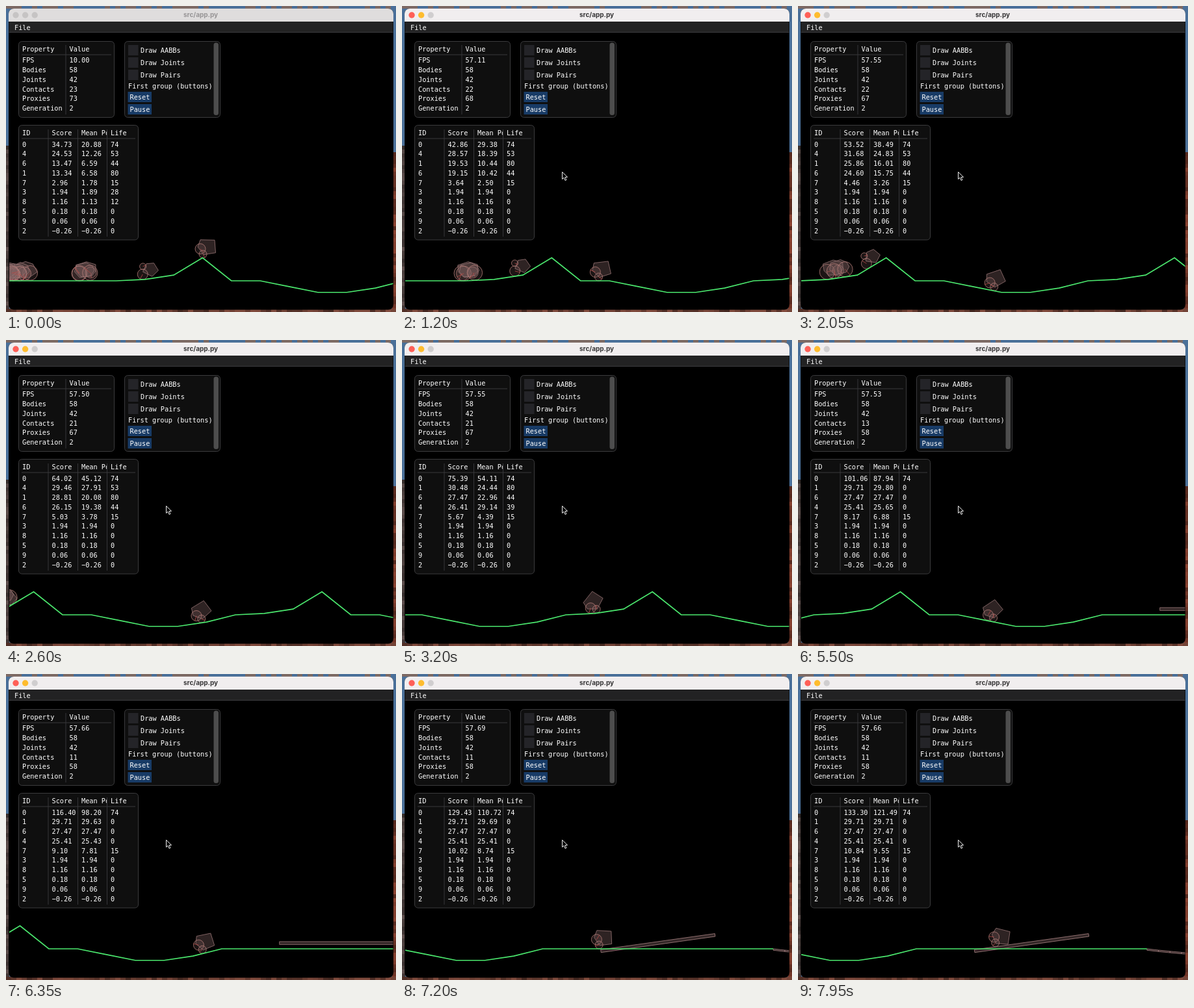
Animation, 600 px wide and 471 px high, one loop 8 s. Source, as an HTML page with a canvas:

```html
<!DOCTYPE html>
<html lang="en">
<head>
<meta charset="utf-8">
<title>src/app.py</title>
<style>
html, body { margin: 0; width: 100%; height: 100%; overflow: hidden; background: #000; }
canvas { display: block; }
</style>
</head>
<body>
<canvas id="stage" width="600" height="471"></canvas>
<script>
const ctx = document.getElementById('stage').getContext('2d');
const LOOP = 8000, STEP = 50;
const UNIT = 8.87, BASE = 423, CENTER = 300;
const MEMORY = 2.36; // seconds covered by the mean position
const MONO = '10.25px "DejaVu Sans Mono", monospace';
const RAD = Math.PI / 180;
const clamp = (v, a, b) => Math.min(b, Math.max(a, v));
const smooth = u => u * u * (3 - 2 * u);
const falloff = (t, mid, rate) => 1 / (1 + Math.exp(rate * (t - mid)));

function random(seed) {
  return () => (seed = (seed * 16807) % 2147483647) / 2147483647;
}

// The simulation starts slowly and ends up a constant lag behind real time.
const clock = t => t - 0.72 * (1 - Math.exp(-t / 0.74));
const MARKS = [0, 2.05, 3.2, 4.3, 5.5, 7.2, 7.95].map(clock);

// Monotone cubic through one value per mark; the last value is held.
function curve(...v) {
  const last = v.length - 1;
  const slope = i => (v[i + 1] - v[i]) / (MARKS[i + 1] - MARKS[i]);
  const tangent = i => {
    if (i === 0) return slope(0);
    if (i === last) return slope(last - 1);
    const a = slope(i - 1), b = slope(i);
    return a * b <= 0 ? 0 : 2 * a * b / (a + b);
  };
  return c => {
    if (c >= MARKS[last]) return v[last];
    let i = 0;
    while (c > MARKS[i + 1]) i++;
    const h = MARKS[i + 1] - MARKS[i], u = (c - MARKS[i]) / h, w = 1 - u;
    return v[i] + (v[i + 1] - v[i]) * smooth(u)
      + h * u * w * (tangent(i) * w - tangent(i + 1) * u);
  };
}

const fps = t => 57.6 - 47.6 * Math.exp(-4 * t) + 0.1 * Math.sin(9 * t) * Math.min(t, 1);
const contacts = t => Math.floor(11 + 11 * falloff(t, 4.9, 2.2) + 2 * Math.exp(-2 * t));
const proxies = t => Math.round(58 + 9 * falloff(t, 4.5, 4) + 6 * Math.exp(-2 * t));
const leadAngle = curve(0, -20, -53, -124, -35, 2, 13);

// Uneven ring of corners around (x, y).
function chassis(x, y, rx, ry, corners, seed) {
  const rnd = random(seed * 7919 + 13);
  return Array.from({ length: corners }, (_, i) => {
    const q = (i + 0.4 * rnd()) * 2 * Math.PI / corners, r = 0.8 + 0.3 * rnd();
    return [x + rx * r * Math.cos(q), y + ry * r * Math.sin(q)];
  });
}

// share: mean position at the start as a part of the score.
// stall: time at which the life begins to drain.
function makeCar(id, share, life, stall, travel, shape) {
  const power = share / (1 - share);
  const score = c => c >= 0 ? travel(c) : travel(0) * (1 - (-c / MEMORY) ** power);
  const mean = c => {
    const n = 24;
    let sum = 0;
    for (let i = 0; i < n; i++) sum += score(c - MEMORY * (i + 0.5) / n);
    return sum / n;
  };
  const rnd = random(id * 104729 + 31);
  const size = () => 8.5 + 3.5 * rnd();
  return {
    id, score, mean,
    life: t => clamp(Math.round(life - Math.max(0, t - stall) * 70), 0, life),
    body: chassis(12, -15, 17, 13, 7, id + 1),
    wheels: [[2, -10, size()], [19, -11, size()]],
    ...shape
  };
}
const parked = (id, score, share = 1, life = 0) => makeCar(id, share, life, 0, () => score);

const lead = makeCar(0, 0.601, 74, Infinity,
  curve(34.73, 53.52, 75.39, 87.79, 101.06, 129.43, 133.3), {
    body: [[-1, -25.5], [21, -25], [22.5, -5.5], [4, -2.5], [-5, -14.5]],
    wheels: [[-1, -11.5, 8], [3, -3.3, 6]]
  });
const cars = [
  lead,
  makeCar(4, 0.5, 53, 3, curve(24.53, 31.68, 26.41, 25.41), {
    body: chassis(14, -11, 13, 12, 5, 4),
    wheels: [[1, -5, 8], [2, -17, 5]]
  }),
  makeCar(6, 0.489, 44, 4.5, curve(13.47, 24.6, 27.47)),
  makeCar(1, 0.493, 80, 4.3, curve(13.34, 25.86, 30.48, 29.5, 29.71)),
  makeCar(7, 0.601, 15, Infinity, c => 2.96 + 1.09 * c),
  parked(3, 1.94, 0.974, 28), parked(8, 1.16, 0.974, 12),
  parked(5, 0.18), parked(9, 0.06), parked(2, -0.26)
];

const hills = [0.25, 1, 4, 0, 0, -1, -2, -2, -1.25, 0];
function ground(x) {
  if (x < 20 || x >= 120) return 0;
  const p = (x - 20) / 5, i = Math.floor(p);
  const a = hills[(i + 9) % 10], b = hills[i % 10];
  return a + (b - a) * (p - i);
}

let cam = 0, tilt = 0;
const sx = x => CENTER + (x - cam) * UNIT;
const sy = y => BASE - y * UNIT;

function surface(x) {
  const y = ground(x);
  return x > 130 && x < 150 ? Math.max(y, 1.25 + (x - 140) * Math.tan(tilt)) : y;
}

function path(points, close) {
  ctx.beginPath();
  for (const [x, y] of points) ctx.lineTo(x, y);
  if (close) ctx.closePath();
}

function paint(alpha, stroke) {
  ctx.fillStyle = `rgba(128,98,98,${alpha})`;
  ctx.strokeStyle = stroke;
  ctx.lineWidth = 0.8;
  ctx.fill();
  ctx.stroke();
}

function plank(x, y, w, h, angle) {
  ctx.save();
  ctx.translate(x, y);
  ctx.rotate(angle);
  ctx.beginPath();
  ctx.rect(-w / 2, -h / 2, w, h);
  paint(0.4, '#a07c7c');
  ctx.restore();
}

function drawCar(car, c) {
  const pos = car.score(c), x0 = sx(pos);
  if (x0 < -40) return;
  const slope = Math.atan((ground(pos + 1) - ground(pos - 1)) / 2);
  const a = car === lead ? leadAngle(c) * RAD : -0.7 * slope;
  const cos = Math.cos(a), sin = Math.sin(a);
  const turn = ([x, y, r]) => [x * cos - y * sin, x * sin + y * cos, r];
  const body = car.body.map(turn), wheels = car.wheels.map(turn);

  // Lower the car until its first point touches the surface.
  const feet = [...body];
  for (const [x, y, r] of wheels)
    for (let i = 0; i <= 12; i++) {
      const q = i * Math.PI / 12;
      feet.push([x + r * Math.cos(q), y + r * Math.sin(q)]);
    }
  const y0 = Math.min(...feet.map(([x, y]) => sy(surface(pos + x / UNIT)) - y));

  ctx.save();
  ctx.translate(x0, y0);
  path(body, true);
  paint(0.36, '#9a7676');
  for (const [x, y, r] of wheels) {
    ctx.beginPath();
    ctx.arc(x, y, r, 0, 7);
    paint(0.22, '#b47d78');
    const q = pos * UNIT / r;
    path([[x, y], [x + r * Math.cos(q), y + r * Math.sin(q)]]);
    ctx.strokeStyle = '#b84a46';
    ctx.stroke();
  }
  ctx.restore();
}

function drawWorld(c) {
  cam = lead.score(c);
  tilt = 8 * RAD * smooth(clamp((cam - 126.5) / 1.7, 0, 1));
  ctx.save();
  ctx.beginPath();
  ctx.rect(5, 41, 590.5, 426);
  ctx.clip();

  for (const car of cars) drawCar(car, c);
  plank(sx(140), sy(1), 20 * UNIT, 0.5 * UNIT, -tilt);
  const sag = x => -0.125 - 1.2 * (1 - ((x - 180) / 20) ** 2);
  for (let x = 160; x < 200; x += 2) {
    const a = sag(x), b = sag(x + 2);
    plank(sx(x + 1), sy((a + b) / 2), 2 * UNIT, 0.25 * UNIT, Math.atan((a - b) / 2));
  }

  const line = [[sx(-20), BASE]];
  for (let x = 20; x <= 120; x += 5) line.push([sx(x), sy(ground(x))]);
  line.push([sx(160), BASE]);
  path(line);
  ctx.strokeStyle = '#4be86e';
  ctx.lineWidth = 1.7;
  ctx.stroke();
  ctx.restore();
}

function rect(x, y, w, h, fill, r = 0, stroke) {
  ctx.beginPath();
  ctx.roundRect(x, y, w, h, r);
  ctx.fillStyle = fill;
  ctx.fill();
  if (stroke) {
    ctx.strokeStyle = stroke;
    ctx.lineWidth = 1;
    ctx.stroke();
  }
}

function text(str, x, y) {
  ctx.font = MONO;
  ctx.textAlign = 'left';
  ctx.fillStyle = '#fff';
  ctx.fillText(String(str).replace('-', '\u2212'), x, y + 3.6);
}

const panel = (x, y, w, h) => rect(x + 0.5, y + 0.5, w, h, '#0f0f0f', 5, '#3b3b3d');

function grid(left, right, top, bottom, rule, columns) {
  rect(left, rule, right - left, 1, '#3a3a3d');
  for (const x of columns) rect(x, top, 1, bottom - top, '#37373a');
}

function drawStats(t) {
  panel(19, 54, 147, 117);
  grid(24, 162, 60, 167, 74.5, [91.5]);
  text('Property', 25, 66);
  text('Value', 97.5, 66);
  const rows = { FPS: fps(t).toFixed(2), Bodies: 58, Joints: 42,
    Contacts: contacts(t), Proxies: proxies(t), Generation: 2 };
  Object.entries(rows).forEach(([name, value], i) => {
    const y = 83.8 + i * 14.75;
    text(name, 25, y);
    text(value, 97.5, y);
  });
}

function drawControls() {
  panel(182, 54, 147, 117);
  ['Draw AABBs', 'Draw Joints', 'Draw Pairs'].forEach((label, i) => {
    rect(188, 60 + i * 19, 15.5, 16, '#242428');
    text(label, 207, 68 + i * 19);
  });
  text('First group (buttons)', 188, 123.7);
  ['Reset', 'Pause'].forEach((label, i) => {
    rect(187.5, 132 + i * 19, 36.5, 16, '#183b66');
    text(label, 190.5, 140 + i * 19);
  });
  rect(319.5, 56.5, 7.5, 111.5, '#4d4d4d', 3.5);
}

function drawScores(t, c) {
  const columns = [25, 70.5, 116, 161];
  const row = (cells, y) => cells.forEach((cell, i) => text(cell, columns[i], y));
  panel(19, 183, 184, 176.5);
  grid(24, 199, 190, 355, 203.5, [64.5, 110, 155]);
  row(['ID', 'Score', '', 'Life'], 195.3);
  ctx.save();
  ctx.beginPath();
  ctx.rect(112, 186, 43, 18);
  ctx.clip();
  text('Mean Pos', 116, 195.3);
  ctx.restore();
  [...cars].sort((a, b) => b.score(c) - a.score(c)).forEach((car, i) =>
    row([car.id, car.score(c).toFixed(2), car.mean(c).toFixed(2), car.life(t)], 213 + i * 14.77));
}

// Blue sky above rocks, seen only as a rim around the window.
function drawDesktop() {
  const rnd = random(97);
  rect(0, 0, 600, 471, '#4a7099');
  const rocks = (x, w, y0, tone) => {
    for (let y = y0; y < 471; y += 6) {
      const k = 0.65 + 0.5 * rnd();
      rect(x, y, w, 6, `rgb(${tone.map(v => v * k)})`);
    }
  };
  rocks(0, 5, 215, [84, 70, 68]);
  rocks(594, 6, 225, [122, 58, 42]);
  for (let x = 0; x < 600; x += 8) {
    const k = 0.6 + 0.6 * rnd();
    rect(x, 466, 8, 5, `rgb(${[110 * k, 64 * k, 52 * k]})`);
    if (rnd() < 0.4) rect(x, 0, 8, 4, '#7d6a64');
  }
}

function drawWindow(active) {
  rect(4, 4, 592, 463.5, '#000', 8);
  rect(4, 4, 592, 20, active ? '#f1eeef' : '#dfdddd', [8, 8, 0, 0]);
  const lights = active ? ['#fe5f57', '#febc2e', '#d0cecf'] : Array(3).fill('#c6c4c4');
  lights.forEach((color, i) => {
    ctx.beginPath();
    ctx.arc(15 + i * 14.6, 14, 4.7, 0, 7);
    ctx.fillStyle = color;
    ctx.fill();
  });
  ctx.font = '700 10px Inter, sans-serif';
  ctx.textAlign = 'center';
  ctx.fillStyle = active ? '#363536' : '#969495';
  ctx.fillText('src/app.py', 299.5, 17.2);
  rect(4.5, 24, 591, 16, '#222223');
  rect(4.5, 40, 591, 1, '#3d3d40');
  text('File', 13, 33);
}

function drawCursor() {
  ctx.save();
  ctx.translate(246.5, 255.5);
  path([[0, 0], [0, 11], [2.6, 8.7], [4.5, 13], [6.4, 12.2], [4.6, 8], [8, 7.8]], true);
  ctx.fillStyle = '#000';
  ctx.fill();
  ctx.strokeStyle = '#eee';
  ctx.lineWidth = 1;
  ctx.stroke();
  ctx.restore();
}

function frame(now) {
  let ms = Math.floor((now % LOOP) / STEP) * STEP;
  if (ms > 350 && ms < 500) ms = 350;
  const t = ms / 1000, c = clock(t), active = ms >= 500;
  drawDesktop();
  drawWindow(active);
  drawWorld(c);
  drawStats(t);
  drawControls();
  drawScores(t, c);
  if (active) drawCursor();
}

const start = performance.now();
function tick() {
  frame(performance.now() - start);
  requestAnimationFrame(tick);
}
tick();
</script>
</body>
</html>
```
